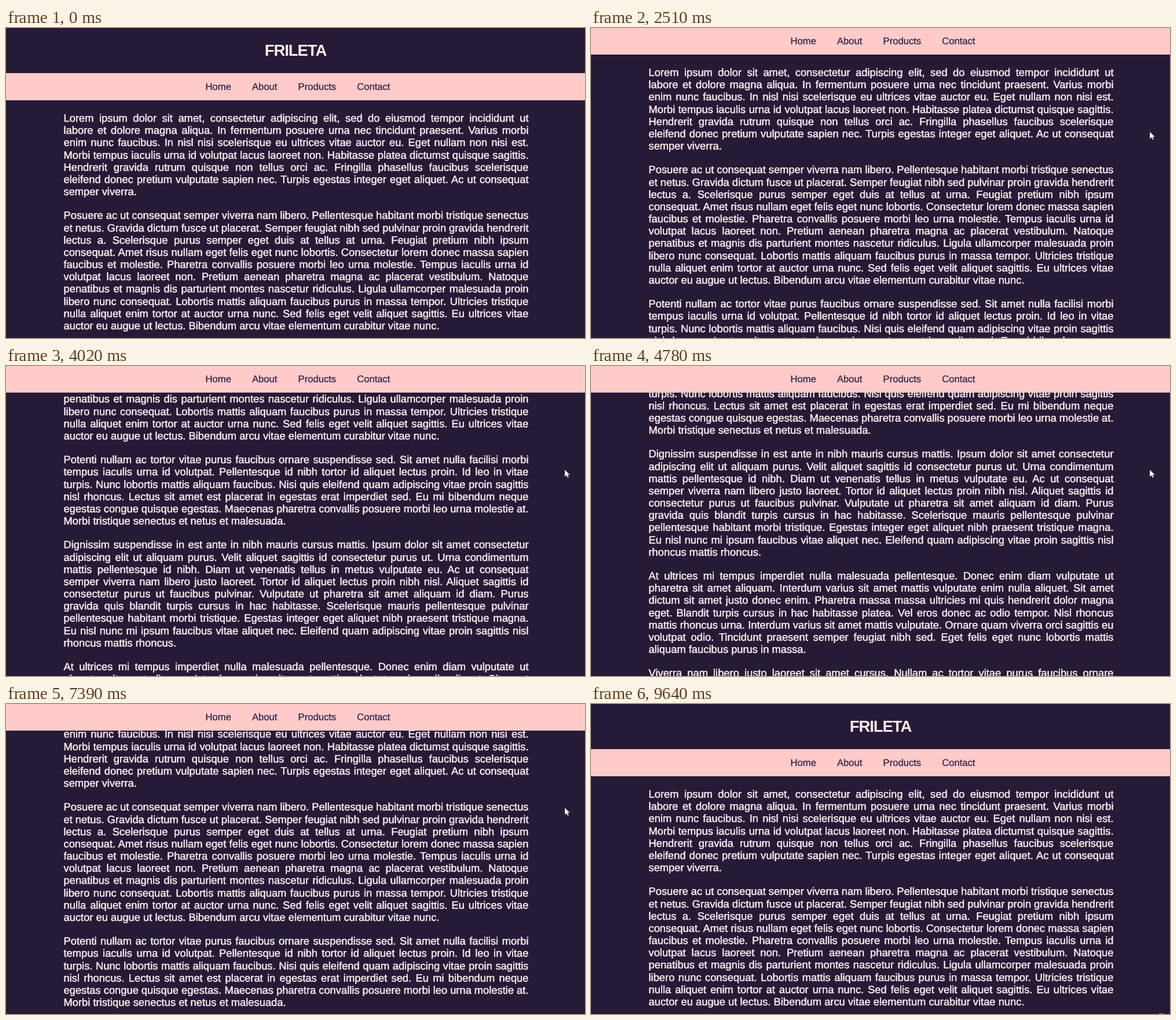
Write an HTML page that moves like this. It is 1000x536 px and loops after 9780 ms.

```html
<!DOCTYPE html>
<html lang="en">
<head>
<meta charset="utf-8">
<title>Sticky navigation</title>
<style>
  html, body { margin: 0; width: 100%; height: 100%; overflow: hidden; background: #251b37; }
  #stage {
    position: relative; width: 1000px; height: 536px; overflow: hidden;
    background: #251b37; color: #ffecef;
    font-family: "Liberation Sans", Arial, sans-serif;
    text-rendering: geometricPrecision;
  }
  #page { position: absolute; left: 0; top: 0; width: 1000px; }
  h1 {
    position: absolute; left: 0; top: 0; width: 1000px; margin: 0;
    font-size: 27.5px; line-height: 78px; letter-spacing: -1.1px; text-align: center;
  }
  #text { position: absolute; left: 99.5px; top: 145px; width: 803px; }
  #text p {
    margin: 0 0 20px; font-size: 18.33px; line-height: 21.2px;
    -webkit-text-stroke: 0.5px currentColor;
  }
  #text span {
    display: block; height: 21.2px; white-space: nowrap; word-spacing: -1.5px;
    text-align: justify; text-align-last: justify;
  }
  #text span:last-child { word-spacing: 0; text-align-last: left; }
  nav {
    position: absolute; left: 0; top: 78px; width: 1000px; height: 47px;
    box-sizing: border-box; padding-left: 344.6px;
    display: flex; gap: 36.2px; background: #ffcaca; color: #372948;
    font-size: 16.6px; line-height: 48px; -webkit-text-stroke: 0.35px currentColor;
  }
  svg { position: absolute; left: 0; top: 0; }
</style>
</head>
<body>
<div id="stage">
  <div id="page">
    <h1>FRILETA</h1>
    <div id="text"></div>
  </div>
  <nav><span>Home</span><span>About</span><span>Products</span><span>Contact</span></nav>
  <svg width="1000" height="536" viewBox="0 0 1000 536">
    <path id="cursor" d="M0 0V13L3 10.2L5 14.5L7.1 13.6L5.2 9.4H9.2Z" fill="#fff" stroke="#15101f" stroke-width="0.5"/>
    <rect id="edge" x="981" y="535" width="8" height="1" fill="#a39da8"/>
  </svg>
</div>
<script>
const LOOP = 9780;

const paragraphs = [
`Lorem ipsum dolor sit amet, consectetur adipiscing elit, sed do eiusmod tempor incididunt ut
labore et dolore magna aliqua. In fermentum posuere urna nec tincidunt praesent. Varius morbi
enim nunc faucibus. In nisl nisi scelerisque eu ultrices vitae auctor eu. Eget nullam non nisi est.
Morbi tempus iaculis urna id volutpat lacus laoreet non. Habitasse platea dictumst quisque sagittis.
Hendrerit gravida rutrum quisque non tellus orci ac. Fringilla phasellus faucibus scelerisque
eleifend donec pretium vulputate sapien nec. Turpis egestas integer eget aliquet. Ac ut consequat
semper viverra.`,
`Posuere ac ut consequat semper viverra nam libero. Pellentesque habitant morbi tristique senectus
et netus. Gravida dictum fusce ut placerat. Semper feugiat nibh sed pulvinar proin gravida hendrerit
lectus a. Scelerisque purus semper eget duis at tellus at urna. Feugiat pretium nibh ipsum
consequat. Amet risus nullam eget felis eget nunc lobortis. Consectetur lorem donec massa sapien
faucibus et molestie. Pharetra convallis posuere morbi leo urna molestie. Tempus iaculis urna id
volutpat lacus laoreet non. Pretium aenean pharetra magna ac placerat vestibulum. Natoque
penatibus et magnis dis parturient montes nascetur ridiculus. Ligula ullamcorper malesuada proin
libero nunc consequat. Lobortis mattis aliquam faucibus purus in massa tempor. Ultricies tristique
nulla aliquet enim tortor at auctor urna nunc. Sed felis eget velit aliquet sagittis. Eu ultrices vitae
auctor eu augue ut lectus. Bibendum arcu vitae elementum curabitur vitae nunc.`,
`Potenti nullam ac tortor vitae purus faucibus ornare suspendisse sed. Sit amet nulla facilisi morbi
tempus iaculis urna id volutpat. Pellentesque id nibh tortor id aliquet lectus proin. Id leo in vitae
turpis. Nunc lobortis mattis aliquam faucibus. Nisi quis eleifend quam adipiscing vitae proin sagittis
nisl rhoncus. Lectus sit amet est placerat in egestas erat imperdiet sed. Eu mi bibendum neque
egestas congue quisque egestas. Maecenas pharetra convallis posuere morbi leo urna molestie at.
Morbi tristique senectus et netus et malesuada.`,
`Dignissim suspendisse in est ante in nibh mauris cursus mattis. Ipsum dolor sit amet consectetur
adipiscing elit ut aliquam purus. Velit aliquet sagittis id consectetur purus ut. Urna condimentum
mattis pellentesque id nibh. Diam ut venenatis tellus in metus vulputate eu. Ac ut consequat
semper viverra nam libero justo laoreet. Tortor id aliquet lectus proin nibh nisl. Aliquet sagittis id
consectetur purus ut faucibus pulvinar. Vulputate ut pharetra sit amet aliquam id diam. Purus
gravida quis blandit turpis cursus in hac habitasse. Scelerisque mauris pellentesque pulvinar
pellentesque habitant morbi tristique. Egestas integer eget aliquet nibh praesent tristique magna.
Eu nisl nunc mi ipsum faucibus vitae aliquet nec. Eleifend quam adipiscing vitae proin sagittis nisl
rhoncus mattis rhoncus.`,
`At ultrices mi tempus imperdiet nulla malesuada pellentesque. Donec enim diam vulputate ut
pharetra sit amet aliquam. Interdum varius sit amet mattis vulputate enim nulla aliquet. Sit amet
dictum sit amet justo donec enim. Pharetra massa massa ultricies mi quis hendrerit dolor magna
eget. Blandit turpis cursus in hac habitasse platea. Vel eros donec ac odio tempor. Nisl rhoncus
mattis rhoncus urna. Interdum varius sit amet mattis vulputate. Ornare quam viverra orci sagittis eu
volutpat odio. Tincidunt praesent semper feugiat nibh sed. Eget felis eget nunc lobortis mattis
aliquam faucibus purus in massa.`,
`Viverra nam libero justo laoreet sit amet cursus. Nullam ac tortor vitae purus faucibus ornare
suspendisse sed nisi lacus.`
];

// [start ms, scroll offset]
const scrolls = [
  [0, 0], [2510, 79], [2890, 158], [3270, 236], [3650, 315], [4020, 394], [4400, 473], [4780, 551],
  [6270, 479], [6650, 400], [7030, 290], [7390, 146], [7770, 3], [8150, 0]
];

// [start ms, x, y]
const pointer = [
  [0, -50, -50], [240, 971, 237], [610, 994, 194], [990, 973, 177.5], [1370, 965, 179],
  [8900, 972, 472], [9280, 981, 535], [9640, -50, -50]
];

const $ = id => document.getElementById(id);
const nav = document.querySelector("nav");
const at = (steps, t) => steps.findLast(step => step[0] <= t);

$("text").innerHTML = paragraphs
  .map(p => "<p>" + p.split("\n").map(line => `<span>${line}</span>`).join("") + "</p>")
  .join("");

function draw(t) {
  const scroll = at(scrolls, t)[1];
  const [, x, y] = at(pointer, t);
  $("page").style.top = -scroll + "px";
  nav.style.top = Math.max(-1, 78 - scroll) + "px";
  $("cursor").setAttribute("transform", `translate(${x} ${y})`);
  $("edge").setAttribute("visibility", t >= 9640 ? "visible" : "hidden");
}

function tick() {
  draw(performance.now() % LOOP);
  requestAnimationFrame(tick);
}
tick();
</script>
</body>
</html>
```
